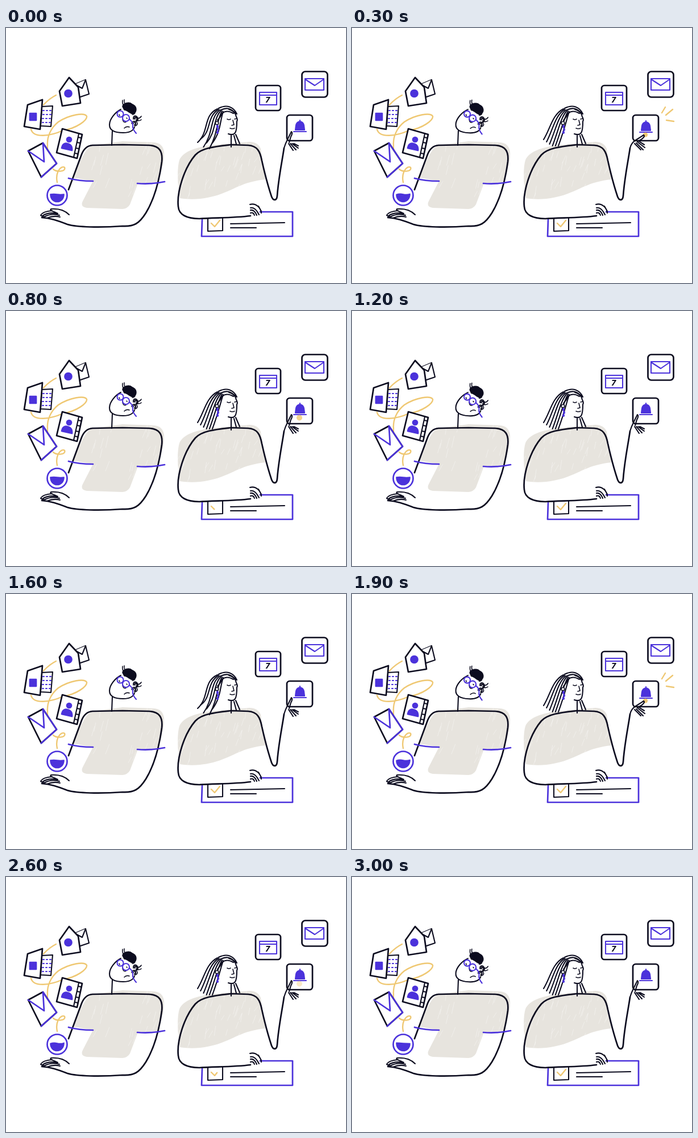
Recreate the animation shown at these times as an HTML page. Size 598 by 448 pixels, loop 3200 ms.

```html
<!DOCTYPE html>
<html lang="en">
<head>
<meta charset="utf-8">
<title>Two people at work</title>
<style>
  html, body { margin: 0; width: 100%; height: 100%; overflow: hidden; background: #fff; }
  svg { display: block; width: 100%; height: 100%; }
  path, rect, circle { fill: none; stroke: #0c0c1f; stroke-width: 2.7; stroke-linecap: round; stroke-linejoin: round; }
  .violet * { stroke: #4b32db; }
  .violet .solid { fill: #4b32db; }
  .yellow * { stroke: #efc873; stroke-width: 2.4; }
  .paper * { fill: #fff; }
  .medium, .medium * { stroke-width: 2.1; }
  .thin, .thin * { stroke-width: 1.6; }
  .ink { fill: #0c0c1f; }
  .beige path { fill: #e7e4de; stroke: none; }
  .chalk path { stroke: #fff; stroke-width: .8; opacity: .45; }
  text { font: italic 700 15px "Noto Sans", sans-serif; fill: #0c0c1f; }
</style>
</head>
<body>
<svg viewBox="0 0 598 448">
  <defs>
    <clipPath id="cloth">
      <use href="#manCloth"/>
      <use href="#womanCloth"/>
    </clipPath>
  </defs>
  <g class="beige">
    <path id="manCloth" d="M119 263L153 269L135 304Q130 314 142 316L205 318Q214 317 218 310L232 273L266 271C274 250 279 230 278 218Q276 202 260 201L205 199L152 206Q137 211 119 263Z"/>
    <path id="womanCloth" d="M306 299C301 275 301 245 305 232C312 216 335 210 360 206L428 200Q443 200 448 212L456 266C420 270 405 281 387 288C360 300 330 303 306 299Z"/>
  </g>
  <g id="chalk" class="chalk" clip-path="url(#cloth)"></g>

  <!-- flying papers -->
  <g class="yellow">
    <path d="M88 118Q76 124 66 135M44 178C48 194 78 190 100 180C125 176 143 162 142 155C138 148 112 152 92 165C78 176 72 192 73 206C72 220 76 230 84 236M83 248C90 254 106 252 103 245C98 241 86 252 90 271"/>
  </g>
  <g class="paper">
    <path class="medium" d="M121 99L140 91L146 116L128 122Z"/>
    <path class="medium" d="M121 99L134 106L140 91"/>
    <path d="M111 87L94 111L99 137L131 132L127 104Z"/>
    <path class="medium" d="M63 138L82 137L79 173L61 172Z"/>
    <path d="M38 135L64 126L60 178L32 173Z"/>
    <path d="M99 177L134 187L125 229L89 219Z"/>
    <path d="M39 216L65 202L89 238L62 262Z"/>
  </g>
  <path class="medium" d="M128 186L119 227M127 192L132 193M125 201L130 202M123 211L128 212M121 220L126 221"/>
  <g class="violet">
    <circle class="solid" cx="109.5" cy="115" r="6"/>
    <rect class="solid" x="42" y="150" width="11" height="12"/>
    <path class="medium" d="M65 145H80M65 152H79M64 159H78M64 166H78" stroke-dasharray="2 4"/>
    <circle class="solid" cx="111" cy="196" r="4"/>
    <path class="solid" d="M98 211Q100 201 108 203Q117 205 116 215Z"/>
    <path d="M39 216L67 235L65 202L89 238L62 262"/>
    <circle cx="90" cy="294" r="17.5"/>
    <path id="liquid" class="solid thin"/>
  </g>

  <!-- man -->
  <path d="M110 284L133 222Q139 207 152 206L205 205L252 206C270 207 276 217 274 235C269 272 260 302 246 325C234 344 225 349 205 348C165 351 125 350 108 345C90 338 78 334 63 333"/>
  <path class="medium" d="M111 328C103 320 92 317 79 318C76 320 83 322 91 326M80 321C70 322 63 325 61 329Q64 332 69 331M91 326Q74 323 64 330M94 329Q79 325 67 332M95 332Q84 329 72 334"/>
  <g class="violet"><path d="M110 264Q128 269 153 269M231 273Q255 275 279 270"/></g>
  <path class="medium" d="M187 181L186 206"/>
  <g id="manHead">
    <path class="medium" d="M202 143C192 148 182 160 182 170C182 181 193 184 206 184C217 184 224 180 226 174"/>
    <path class="thin" d="M208 176Q212 172 217 174M205 160Q206 167 211 165M199 152L200 154M212 158L213 159"/>
    <path class="ink thin" d="M205 138C206 132 217 129 222 134C230 137 231 146 225 150C219 153 215 144 208 144Z"/>
    <g id="curls" class="thin"></g>
    <g class="violet medium">
      <circle cx="201" cy="151" r="5.5"/>
      <circle cx="211" cy="158" r="6"/>
      <path d="M217 160Q224 166 223 172Q222 177 229 185"/>
    </g>
  </g>

  <!-- task card -->
  <g class="violet"><path d="M345 337L344 366L504 366L504 323L447 323"/></g>
  <path d="M355 335L355 357L381 356L381 334M395 344L490 342M395 351L440 351" class="medium"/>
  <g class="yellow"><path id="tick" d="M361 343L367 349L376 338" pathLength="1"/></g>

  <!-- tiles -->
  <rect x="439" y="101" width="44" height="44" rx="5"/>
  <rect x="520.5" y="76.5" width="45" height="45" rx="6"/>
  <rect x="494" y="153" width="45" height="45" rx="5"/>
  <g class="violet medium">
    <path d="M446 113H476V135H446ZM446 118H476"/>
    <path d="M526 89H559V109H526ZM526 90L543 101L559 90"/>
    <g id="bell">
      <path class="solid" d="M509 179L510 171Q511 165 517 164Q523 165 524 171L525 179Z"/>
      <path d="M506 182H528M517 162V164"/>
    </g>
  </g>
  <text x="456" y="131">7</text>
  <circle id="glow" cx="516" cy="187.5" style="fill:#efc873;stroke:none"/>
  <g id="rays" class="yellow"></g>

  <!-- woman -->
  <path d="M430 330C400 334 365 333 340 335C318 335 304 328 303 314C300 287 314 245 333 223C345 210 370 208 396 205L426 206C442 207 447 217 450 233C456 260 463 284 467 296C470 304 476 304 477 295C479 265 486 232 489 211"/>
  <path class="medium" d="M429 310C440 307 448 316 449 325M430 316Q438 314 445 328M430 320Q437 319 441 329M430 325Q435 323 437 329M444 313L449 322"/>
  <path class="medium" d="M396 189V209M392 143C400 145 404 150 405 156Q408 161 406 164C406 172 406 180 403 184Q400 189 391 186"/>
  <path class="thin" d="M389 160Q392 162 395 160M402 160L406 159M399 162L401 170L397 171M394 176Q398 178 402 176"/>
  <g id="hair" class="medium"></g>
  <circle class="thin" cx="371" cy="167" r="2.8" style="fill:#fff"/>
  <g class="violet"><path d="M372 172V174M373 178V179M372 183V184" style="stroke-width:4"/></g>
  <path id="pointing" class="medium"/>
</svg>
<script>
const LOOP = 1600, STEP = 100;
const byId = id => document.getElementById(id);
const clamp = v => Math.max(0, Math.min(1, v));
const pathTag = d => `<path d="${d}"/>`;
const set = (id, attributes) => {
  for (const name in attributes) byId(id).setAttribute(name, attributes[name]);
};

let seed = 11;
const random = () => (seed = seed * 16807 % 2147483647) / 2147483647;

function drawChalk() {
  let marks = '';
  for (let i = 0; i < 90; i++) {
    const x = 120 + random() * 330, y = 205 + random() * 95;
    marks += pathTag(`M${x} ${y}l${2 + random() * 5} ${-8 - random() * 12}`);
  }
  byId('chalk').innerHTML = marks;
}

function drawCurls() {
  const centres = [[212, 141], [222, 148], [229, 160], [226, 168]];
  let curls = pathTag('M208 138Q204 133 205 127M211 136Q207 131 208 126M230 158Q235 160 238 155M229 162Q235 164 238 161');
  for (const [x, y] of centres) {
    for (let r = 2; r < 6; r += 1.5) {
      curls += pathTag(`M${x - r} ${y}a${r} ${r * .8} ${random() * 90} 1 1 ${r} ${r * .8}`);
    }
  }
  byId('curls').innerHTML = curls;
}

function hairPaths(flowing) {
  let strands = pathTag('M406 151C400 138 388 134 374 141M404 150C395 141 388 139 378 144M400 150Q388 143 380 150Q377 157 372 162M404 187L411 203M401 189L405 204');
  for (let i = 0; i < 6; i++) {
    const endX = 337 + i * 5.2, endY = 196 + Math.min(i * 4, 11);
    const topX = 372 + i * 2, topY = 142 + i;
    strands += flowing
      ? pathTag(`M${topX} ${topY}C${346 + i * 6} ${154 + i * 2} ${358 + i * 4} 182 ${endX} ${endY + (i % 2 ? -5 : 5)}`)
      : pathTag(`M${topX} ${topY}C${352 + i * 5} ${152 + i * 2} ${349 + i * 5} 177 ${endX} ${endY}`);
  }
  return strands;
}

const hair = { flowing: hairPaths(true), straight: hairPaths(false) };
const hands = {
  resting: 'M489 211Q491 204 495 196L502 182Q505 184 501 191L498 201M497 203L505 215M500 203L510 214M503 203L514 211M506 203L514 207',
  pressing: 'M489 211Q491 202 499 197L513 188Q516 190 510 195L502 200M497 203L508 214M500 202L512 214M503 201L515 210M506 200L514 205'
};

function rays(t) {
  if (t < 200 || t >= 600) return '';
  const start = clamp((t - 300) / 260), end = clamp((t - 100) / 200) + start * .25;
  return [[545, 149, 551, 139], [552, 153, 564, 143], [553, 162, 566, 164]].map(([x, y, x2, y2]) => {
    const at = k => `${x + (x2 - x) * k} ${y + (y2 - y) * k}`;
    return pathTag(`M${at(start)}L${at(end)}`);
  }).join('');
}

function render(ms) {
  const t = Math.floor(ms % LOOP / STEP) * STEP;
  const leaning = t % 800 >= 300;
  const flowing = t < 300 || t >= 400 && t < 700;
  const pressing = t >= 200 && t < 700;

  set('manHead', { transform: leaning ? 'rotate(3 200 180)' : '' });
  byId('hair').innerHTML = flowing ? hair.flowing : hair.straight;
  set('pointing', { d: pressing ? hands.pressing : hands.resting });
  set('bell', { transform: t === 300 ? 'translate(0 1)' : '' });
  byId('rays').innerHTML = rays(t);

  set('glow', { r: pressing ? 4 : 5, opacity: t < 200 ? 0 : pressing ? 1 : .8 * clamp((1200 - t) / 400) });

  const drawn = t < 500 ? 1 - clamp((t - 300) / 200) : clamp((t - 600) / 600);
  set('tick', { 'stroke-dasharray': `${drawn} 2`, visibility: drawn ? 'visible' : 'hidden' });

  const tilt = .6 * Math.sin(t / 800 * 2 * Math.PI);
  set('liquid', { d: `M78 ${292 + tilt}Q84 ${291 - tilt} 90 292T102 ${292 - tilt}C102 310 78 310 78 ${292 + tilt}Z` });
}

function play() {
  render(performance.now());
  requestAnimationFrame(play);
}

drawChalk();
drawCurls();
play();
</script>
</body>
</html>
```
